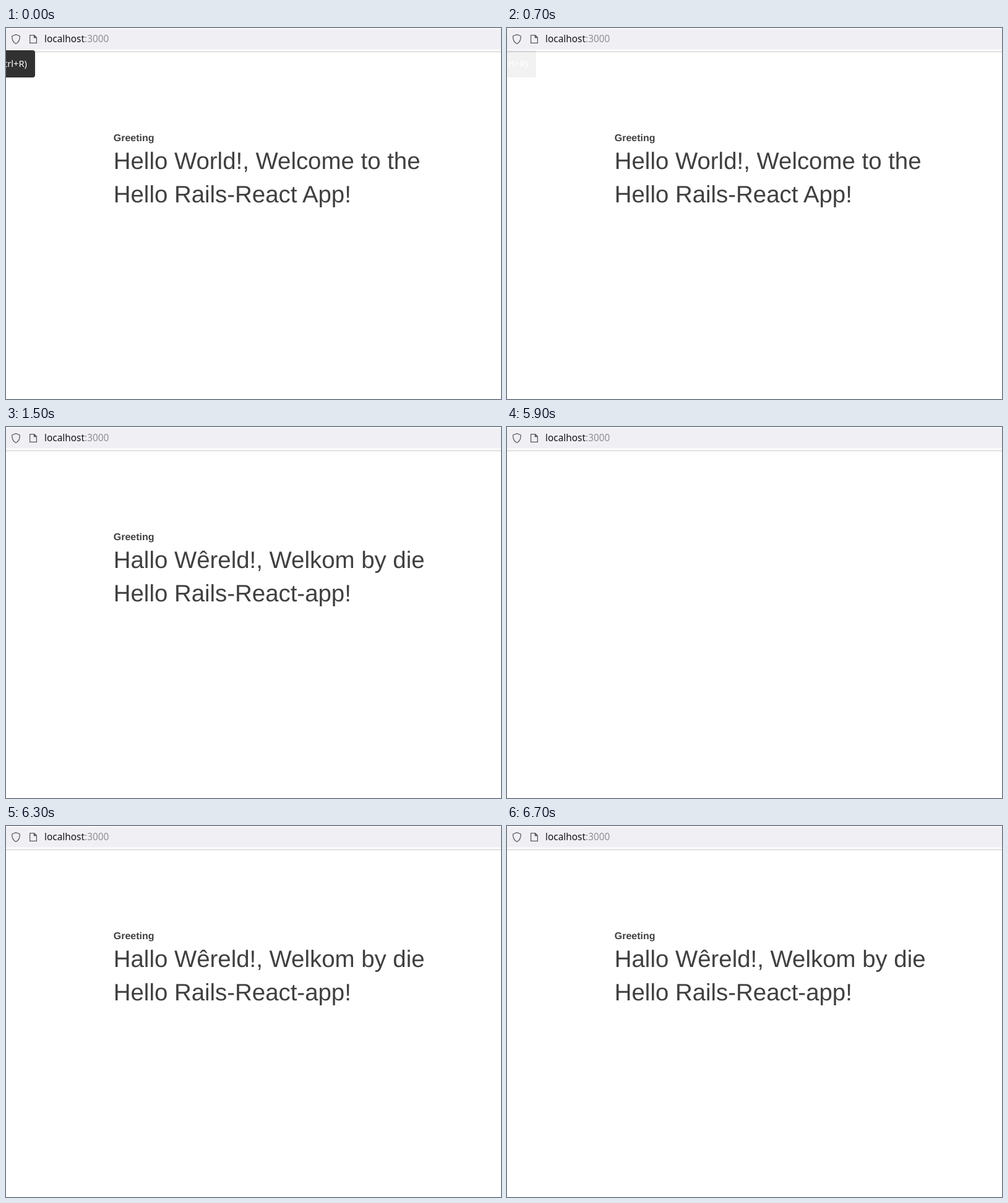
These frames come from a looping animation (800x600 px, 8 s). An HTML page:

```html
<!DOCTYPE html>
<html lang="en">
<head>
<meta charset="utf-8">
<title>Greeting</title>
<style>
  html, body { margin: 0; width: 100%; height: 100%; overflow: hidden; background: #fff; }
  #stage { position: absolute; left: 0; top: 0; width: 800px; height: 600px; overflow: hidden; background: #fff; }
  #stage div, #stage span, #stage svg { position: absolute; white-space: nowrap; }
  #stage svg { left: 0; top: 0; }
  #bar { left: 0; top: 0; width: 800px; height: 38px; background: #f9f9fb; border-bottom: 1px solid #ccc; }
  #field { left: 0; top: 2px; width: 800px; height: 32px; background: #f0f0f4; }
  #url { left: 62px; top: 7px; font: 15.4px/22px "Noto Sans", sans-serif; color: #15141a; }
  #url i { font-style: normal; color: #8f8f96; }
  #tip { left: 0; top: 36px; width: 47px; height: 44px; overflow: hidden; background: #313131; border-radius: 0 4px 4px 0; }
  #tip span { right: 13px; top: 11px; font: 14.67px/20px "Noto Sans", sans-serif; color: #fff; }
  #label, .message { left: 173.8px; color: #404040; text-rendering: geometricPrecision; }
  #label { top: 170px; font: bold 16px/17px "Liberation Sans", Arial, sans-serif; }
  .message { top: 194px; font: 38.4px/43px "Liberation Sans", Arial, sans-serif; }
  .message p { margin: 0 0 11px; }
</style>
</head>
<body>
<div id="stage">
  <div id="bar">
    <div id="field"></div>
    <svg width="60" height="36" fill="none" stroke="#5b5b66" stroke-width="1.3" stroke-linejoin="round">
      <path d="M16 10.7L22.3 13Q22.8 22 16 25.5Q9.2 22 9.7 13Z"/>
      <path d="M38.6 11.7H45.6L49.4 15.5V24.4H38.6Z"/>
      <path d="M45.4 11.7V15.7H49.4Z" fill="#5b5b66"/>
    </svg>
    <span id="url">localhost<i>:3000</i></span>
  </div>
  <div id="tip"><span>Reload current page (Ctrl+R)</span></div>
  <div id="label">Greeting</div>
  <div id="english" class="message"><p>Hello World!, Welcome to the</p><p>Hello Rails-React App!</p></div>
  <div id="afrikaans" class="message"><p>Hallo Wêreld!, Welkom by die</p><p>Hello Rails-React-app!</p></div>
  <svg id="art" width="800" height="104"></svg>
</div>

<script>
  const LOOP = 8000;
  const $ = id => document.getElementById(id);
  const NAVY = '#272c3d', INK = '#1f2128', LINE = '#17202e',
        PLUM = '#251f2b', STEEL = '#2f4a6c', TEAL = '#8cc4d2', SKY = '#6f93cf';

  let seed = 7;
  const rnd = (min, max) => {
    seed = (seed * 16807) % 2147483647;
    return min + (max - min) * seed / 2147483647;
  };
  const repeat = (n, draw) => Array.from({ length: n }, draw).join('');

  const shape = (d, fill, line = LINE) => `<path d="${d}" fill="${fill}" stroke="${line}" stroke-linejoin="round"/>`;
  const stroke = (d, width, color) => `<path d="${d}" fill="none" stroke="${color}" stroke-width="${width}"/>`;
  const band = (d, width, color) => stroke(d, width + 2, LINE) + stroke(d, width, color);

  // A pointed leaf, leaning down to the right.
  const blade = (x, y, color) => {
    const len = rnd(25, 60), half = len * rnd(.08, .16);
    return `<path d="M0 0Q${len / 2} ${-half} ${len} 0Q${len / 2} ${half} 0 0" fill="${color}"
      transform="translate(${x} ${y}) rotate(${rnd(15, 55)})"/>`;
  };
  const star = (x, y, r, flat = .55) =>
    `<ellipse rx="${r}" ry="${r * flat}" fill="#fff" transform="translate(${x} ${y}) rotate(42)"/>`;

  $('art').innerHTML = [
    `<rect width="800" height="104" fill="${NAVY}"/>`,
    shape('M0 0H184V40L150 78L180 104H0Z', INK, 'none'),
    repeat(26, () => blade(rnd(150, 230), rnd(-8, 60), INK)),
    repeat(9, () => blade(rnd(70, 135), rnd(0, 70), NAVY)),
    star(65, 32, 4, .85), star(178, 84, 5),
    repeat(21, () => star(rnd(5, 230), rnd(0, 104), rnd(.8, 2.8))),

    shape('M555 104Q592 63 650 39Q714 21 800 23V104Z', SKY, 'none'),
    shape('M690 98L728 99L734 90L745 104ZM780 25H800V48Z', '#899bb9', 'none'),

    band('M324 44Q350 59 377 45', 4, STEEL),
    shape('M322 26L344 29L342 40H356L358 29L372 25L377 44Q350 57 324 42Z', TEAL),
    shape('M343 41L345 25L354 14L356 41Z', PLUM),
    shape('M349 59L382 104H412Z', PLUM, 'none'),
    shape('M351 58L410 103L405 94Z', TEAL),

    shape('M408 104L440 78L494 33L560 97L553 104Z', STEEL),
    stroke('M440 78L456 104', 10, PLUM),
    shape('M492 32L530 0H601L645 40Q596 60 562 97Q521 72 492 32Z', PLUM),
    stroke('M491 34Q516 78 560 99', 4, '#2d6685'),
    band('M405 98Q418 81 439 76', 9, TEAL),
    band('M440 76Q464 46 492 29L526 -4', 9, TEAL),
    band('M558 104Q594 62 644 41', 6, TEAL),
    shape('M596 0H626L630 9L615 18L607 12Z', STEEL),
    stroke('M610 15L625 6', 9, TEAL),
    band('M630 -2L646 38', 9, TEAL),
    stroke('M600 66Q620 78 619 58', 1, LINE)
  ].join('');

  // Hold each value until the next step.
  function hold(id, prop, steps) {
    const frames = steps.map(([ms, value]) => ({ offset: ms / LOOP, [prop]: value, easing: 'step-end' }));
    frames.push({ offset: 1, [prop]: steps[steps.length - 1][1] });
    $(id).animate(frames, { duration: LOOP, iterations: Infinity });
  }
  // Starts visible or hidden, then flips at each time.
  const flip = (id, on, ...times) =>
    hold(id, 'visibility', [0, ...times].map((ms, i) => [ms, (i % 2 === 0) === on ? 'visible' : 'hidden']));

  hold('tip', 'opacity', [[0, 1], [500, .5], [700, .06], [1100, 0]]);
  flip('label', true, 1100, 1200, 5900, 6000);
  flip('english', true, 1100);
  flip('afrikaans', false, 1500, 5900, 6300);
  flip('art', false, 6600, 6700);
</script>
</body>
</html>
```
